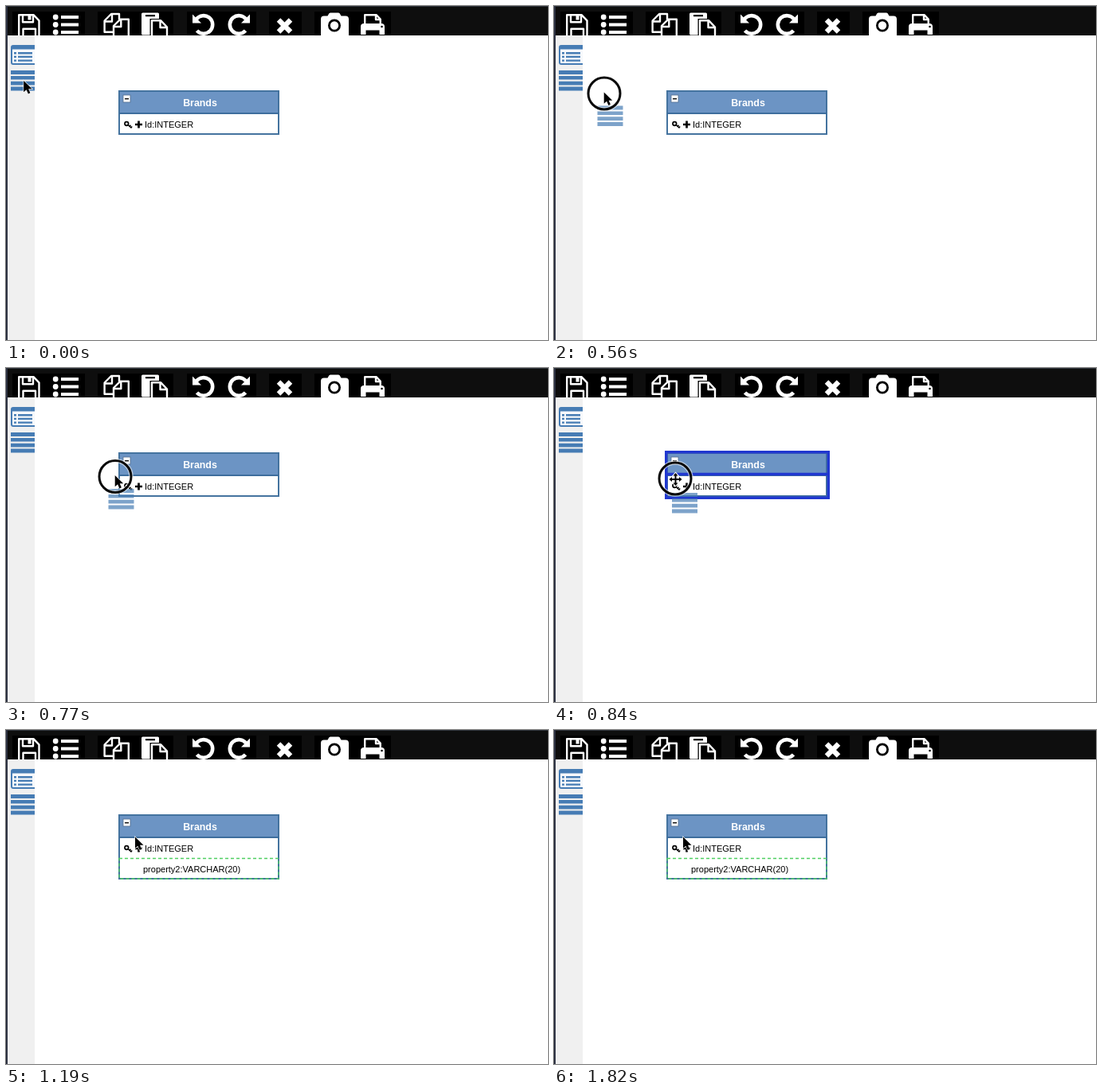
These frames come from a looping animation (680 px wide and 420 px high, 1.89 s). An HTML page:

```html
<!DOCTYPE html>
<html lang="en">
<head>
<meta charset="utf-8">
<title>Dragging a column onto a table</title>
<style>
  html, body { margin: 0; width: 100%; height: 100%; overflow: hidden; background: #fff; }
  svg { display: block; width: 680px; height: 420px; }
  text { font: 11px "Liberation Sans", Arial, sans-serif; }
  .title { font-size: 12.4px; font-weight: bold; fill: #fff; text-anchor: middle; }
  .line { fill: none; stroke: #fff; stroke-width: 2.4; stroke-linejoin: round; }
  .hidden { display: none; }
</style>
</head>
<body>
<svg viewBox="0 0 680 420">
  <defs>
    <clipPath id="bar"><rect width="680" height="37"/></clipPath>
    <clipPath id="side"><rect y="37" width="36" height="383"/></clipPath>
    <path id="rows" fill="#467cb4" d="M0 0h32v5H0zM0 7h32v4.6H0zM0 13.8h32v4.6H0zM0 20.4h32v5H0z"/>
    <g id="turn">
      <path d="M-9.2-6.8A11.3 11.3 0 1 1-8.5 7.5" fill="none" stroke="#fff" stroke-width="4.6"/>
      <path d="M-14-13V-2H-3z" fill="#fff"/>
    </g>
  </defs>

  <rect width="680" height="420" fill="#fff"/>
  <rect y="37" width="36" height="383" fill="#f0f0f0"/>
  <rect width="680" height="37" fill="#0e0e0e"/>

  <g clip-path="url(#bar)">
    <path d="M8 7h91v30H8zM115 7h95v30h-95zM227 7h87v30h-87zM330 7h41v30h-41zM387 7h96v30h-96z"/>
    <!-- save -->
    <path class="line" d="M16.2 11.2H34.5L41.5 18.3V40H16.2zM21 11.5V20.2H34V11.5M21.5 40V28.8H37V40"/>
    <path d="M27.5 11h4v6.5h-4z" fill="#fff"/>
    <!-- list -->
    <g fill="#fff">
      <circle cx="62.2" cy="14" r="3.4"/><circle cx="62.2" cy="23.5" r="3.4"/><circle cx="62.2" cy="33" r="3.4"/>
      <path d="M69 12h22v4H69zM69 21.5h22v4H69zM69 31h22v4H69z"/>
    </g>
    <!-- copy -->
    <path class="line" d="M134.5 32.7H123.6V18.5L132 10H142V17M133 10V19.5H124"/>
    <path class="line" d="M135 40V25L143.5 16.7H153.8V40M144.3 17V26H135"/>
    <!-- paste -->
    <rect x="170" y="8.5" width="22" height="28" rx="1.5" fill="#fff"/>
    <path d="M175 11h12v2.2h-12zM180.5 40V16H195V40z"/>
    <path class="line" d="M183 40V18.2H194L202 26.5V40M193.5 18.2V27H202"/>
    <!-- undo, redo -->
    <use href="#turn" x="248" y="23.5"/>
    <use href="#turn" transform="translate(292 23.5) scale(-1 1)"/>
    <!-- delete -->
    <path d="M342 17.5l15 15M357 17.5l-15 15" stroke="#fff" stroke-width="6.4"/>
    <!-- camera -->
    <path d="M399 12.5h4.5l1.7-3q.7-1 2-1h9.600q1.300 0 2 1l1.700 3H426q4 0 4 4V38H395V16.500q0-4 4-4z" fill="#fff"/>
    <circle cx="412" cy="24.500" r="6.600" fill="none" stroke="#000" stroke-width="2.800"/>
    <!-- print -->
    <path class="line" d="M450.200 24V11.200H464.500L469.700 16.500V24M464 11.500V17H469.500"/>
    <path d="M445 36V26q0-4 4-4h22q4 0 4 4V36z" fill="#fff"/>
    <path d="M451.500 30.500h17V40h-17z"/>
    <circle cx="471.500" cy="26" r="1.300"/>
  </g>
  <path d="M0 0H680V1H0z" fill="#30343c"/>
  <path d="M0 0H2V420H0z" fill="#2c3141"/>

  <g clip-path="url(#side)">
    <rect x="7" y="50" width="31" height="23" rx="2" fill="#f6f8fb" stroke="#467cb4" stroke-width="2"/>
    <path d="M7 50h31v4.500H7z" fill="#467cb4"/>
    <path d="M10 58h3v2.400h-3zm5 0h18v2.400H15zM10 62.700h3v2.400h-3zm5 0h18v2.400H15zM10 67.400h3v2.400h-3zm5 0h18v2.400H15z" fill="#467cb4"/>
    <use href="#rows" x="6" y="81"/>
  </g>

  <!-- table -->
  <rect id="frame" x="142" y="107" width="200" height="54" fill="#fff" stroke="#44739f" stroke-width="2"/>
  <path d="M143 108h198v26H143z" fill="#6c94c4"/>
  <path d="M142 135h200" stroke="#3d6d9d" stroke-width="2"/>
  <rect x="147" y="112" width="9" height="9" fill="#fff" stroke="#526d8e" stroke-width=".8"/>
  <path d="M149 116.700h5" stroke="#000" stroke-width="1.400"/>
  <text class="title" x="243.500" y="126">Brands</text>
  <g fill="none" stroke="#000">
    <circle cx="151.300" cy="148" r="2.300" stroke-width="1.700"/>
    <path d="M153 149.500l4.500 4M155 151.500l1.500-1.700M156.700 153l1.500-1.500" stroke-width="1.500"/>
    <path d="M162 149h9M166.500 144.500v9" stroke-width="2.700"/>
  </g>
  <text x="174" y="153">Id:INTEGER</text>

  <g id="added">
    <rect x="142" y="161.500" width="200" height="25.500" fill="none" stroke="#4fcf62" stroke-width="1.300" stroke-dasharray="4 3"/>
    <text x="172" y="179">property2:VARCHAR(20)</text>
  </g>
  <path id="highlight" d="M140.700 105.700H344.300V163.300H140.700zM141 133.500H344" fill="none" stroke="#2138d0" stroke-width="3.400"/>

  <use id="ghost" href="#rows" opacity=".7"/>
  <g id="ring" fill="none">
    <circle r="20" stroke="#fff" stroke-opacity=".6" stroke-width="5.500"/>
    <circle r="20" stroke="#0a0a0a" stroke-width="3"/>
  </g>
  <path id="arrow" d="M0 0V14.300L3.400 11.200L5.700 16.400L8.200 15.300L6 10.300H10.500z" stroke="#fff" stroke-width="1.200" paint-order="stroke"/>
  <path id="move" d="M0-8L3-4.500H1V-1H4.500V-3L8 0L4.500 3V1H1V4.500H3L0 8L-3 4.500H-1V1H-4.500V3L-8 0L-4.500-3V-1H-1V-4.500H-3z" stroke="#fff" stroke-width="2" paint-order="stroke"/>
</svg>

<script>
const STEP = 70, STEPS = 27;
const PRESS = 5, DRAG = 7, OVER = 12, RELEASE = 16, ADD = 17;
// Pointer centre for each step after the button is pressed
const drag = [[22.5, 95.5], [25, 97], [41, 102.5], [63, 110], [87, 118.5],
              [113, 128], [137, 136.5], [152, 139], [157, 137]];
const part = id => document.getElementById(id);

function show(id, visible) {
  part(id).classList.toggle("hidden", !visible);
}
function place(id, x, y) {
  part(id).setAttribute("transform", `translate(${x} ${y})`);
}

function draw(step) {
  const [x, y] = drag[Math.min(Math.max(step - PRESS, 0), drag.length - 1)];
  const over = step >= OVER, pressed = step >= PRESS && step < RELEASE;
  const added = step >= ADD, moving = over && !added;

  show("ring", pressed);
  place("ring", x, y);
  show("ghost", pressed && step >= DRAG);
  place("ghost", x - (over ? 4 : 8.5), y + (over ? 18 : 15.5));

  show("arrow", !moving);
  if (added) place("arrow", 162, 134.5);
  else place("arrow", x - .3, y - 1.5);
  show("move", moving);
  place("move", x + .5, y + 1);

  show("highlight", over && step < RELEASE);
  show("added", added);
  part("frame").setAttribute("height", added ? 80 : 54);
}

function tick() {
  draw(Math.floor(performance.now() / STEP) % STEPS);
  requestAnimationFrame(tick);
}
tick();
</script>
</body>
</html>
```
